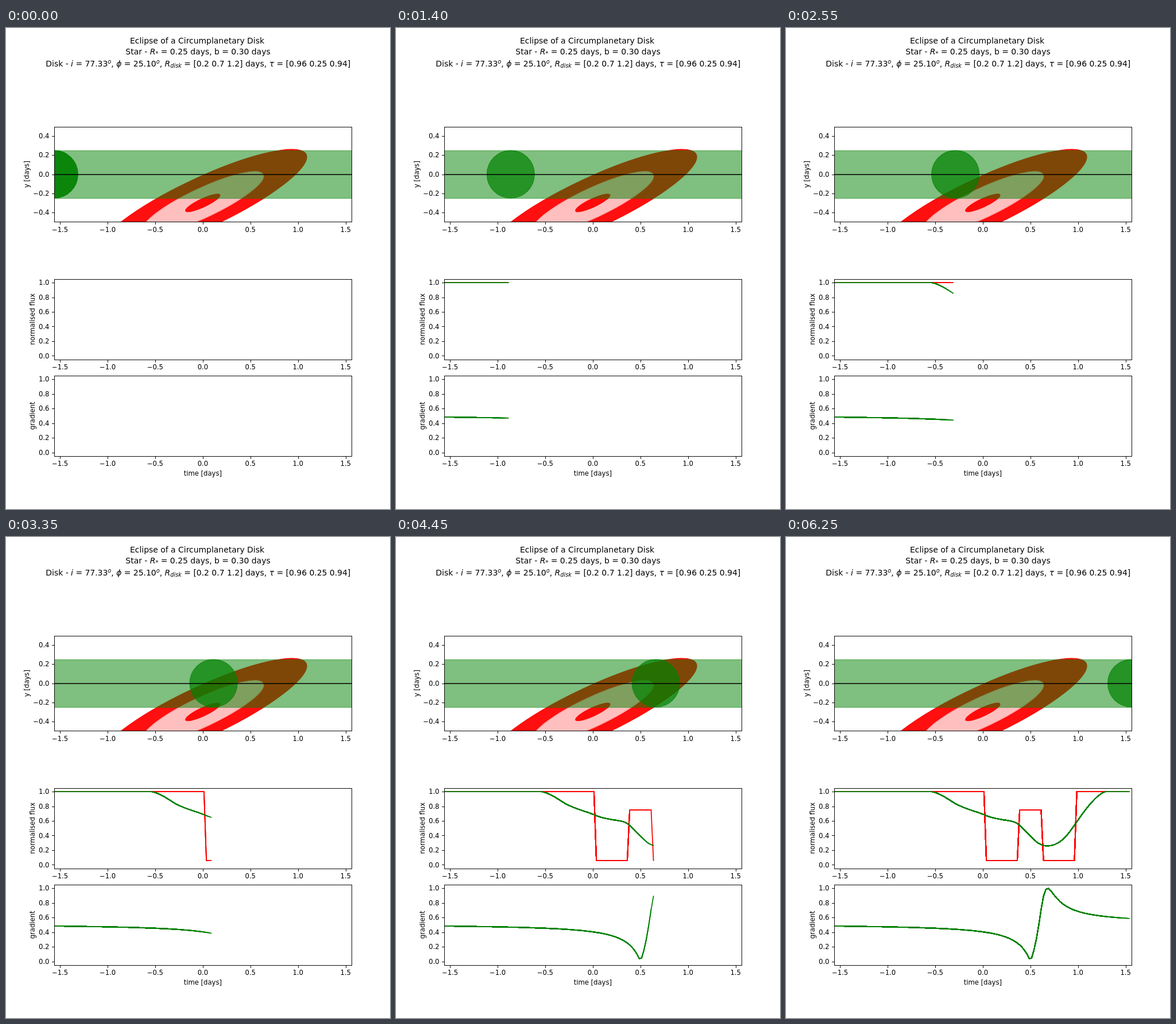
Animation of 669x837 px, one loop 6.3 s. Source, as an HTML page:

```html
<!DOCTYPE html>
<html lang="en">
<head>
<meta charset="utf-8">
<title>Eclipse of a Circumplanetary Disk</title>
<style>
  html, body { margin: 0; width: 100%; height: 100%; overflow: hidden; background: #fff; }
  svg { display: block; font: 11.6px "DejaVu Sans", sans-serif; }
  text { white-space: pre; }
  .title { font-size: 13.93px; text-anchor: middle; }
  .mid { text-anchor: middle; }
  .end { text-anchor: end; }
  .it { font-style: italic; }
  .small { font-style: italic; font-size: 9.75px; }
  .axis { fill: none; stroke: #000; stroke-width: 0.95; }
  .curve { fill: none; stroke-width: 1.74; stroke-linecap: square; stroke-linejoin: round; }
</style>
</head>
<body>
<svg id="stage" width="669" height="837" viewBox="0 0 669 837">
  <text class="title" x="333" y="27">Eclipse of a Circumplanetary Disk</text>
  <text class="title" x="334.5" y="46">Star - <tspan class="it">R</tspan><tspan class="small" dy="2.2">*</tspan><tspan dy="-2.2"> = 0.25 days, b = 0.30 days</tspan></text>
  <text class="title" x="334.8" y="67">Disk - <tspan class="it">i</tspan> = 77.33<tspan class="small" dy="-5">o</tspan><tspan dy="5">, </tspan><tspan class="it">ϕ</tspan> = 25.10<tspan class="small" dy="-5">o</tspan><tspan dy="5">, </tspan><tspan class="it">R</tspan><tspan class="small" dy="2.2">disk</tspan><tspan dy="-2.2"> = [0.2 0.7 1.2] days, </tspan><tspan class="it">τ</tspan> = [0.96 0.25 0.94]</text>
</svg>
<script>
const FRAME_MS = 50, FRAMES = 126;
const STAR_R = 0.25, IMPACT = 0.3;
const INCLINATION = 77.33 * Math.PI / 180, TILT = 25.1 * Math.PI / 180;
const RINGS = [[1.2, 0.94], [0.7, 0.25], [0.2, 0.96]]; // radius, opacity
const SCALE = 165.85, X0 = 342.86, Y0 = 254.56;
const LEFT = 83.625, RIGHT = 602.1;

const px = x => X0 + x * SCALE;
const skyY = y => Y0 - y * SCALE;
const snap = v => Math.floor(v + 0.5) + 0.5;
const unitY = top => v => top + (1.05 - v) * 140.107 / 1.1;
const fluxY = unitY(436.7), gradY = unitY(604.82);
const time = k => -1.5625 + 0.025 * k;

const stage = document.getElementById('stage');
function add(parent, tag, attrs, text) {
  const el = document.createElementNS('http://www.w3.org/2000/svg', tag);
  for (const name in attrs) el.setAttribute(name, attrs[name]);
  if (text !== undefined) el.textContent = text;
  parent.appendChild(el);
  return el;
}

// Shape matrix of a unit-radius ring seen in projection
const cosT = Math.cos(TILT), sinT = Math.sin(TILT), q = Math.cos(INCLINATION) ** 2;
const sxx = cosT ** 2 + q * sinT ** 2;
const syy = sinT ** 2 + q * cosT ** 2;
const sxy = (1 - q) * sinT * cosT;

// Horizontal extent of a ring edge at height y
function chord(radius, y) {
  const h = y + IMPACT, rest = radius ** 2 - h * h / syy;
  if (rest <= 0) return [0, 0];
  const mid = sxy / syy * h, half = Math.sqrt((sxx - sxy * sxy / syy) * rest);
  return [mid - half, mid + half];
}

const overlap = ([a, b], from, to) => Math.max(0, Math.min(b, to) - Math.max(a, from));

// Opacity summed along a horizontal segment
function blocked(y, from, to) {
  const spans = RINGS.map(([r]) => overlap(chord(r, y), from, to));
  return RINGS.reduce((sum, [, tau], i) => sum + tau * (spans[i] - (spans[i + 1] || 0)), 0);
}

function starFlux(x) {
  const n = 240;
  let lost = 0, area = 0;
  for (let i = 0; i < n; i++) {
    const y = STAR_R * ((2 * i + 1) / n - 1), half = Math.sqrt(STAR_R ** 2 - y * y);
    lost += blocked(y, x - half, x + half);
    area += 2 * half;
  }
  return 1 - lost / area;
}

function pointFlux(x) {
  const eps = 1e-6;
  return 1 - blocked(0, x - eps, x + eps) / (2 * eps);
}

function gradient(x) {
  const gx = syy * x - sxy * IMPACT, gy = sxx * IMPACT - sxy * x;
  return Math.abs(gx) / Math.hypot(gx, gy);
}

function panel(id, top, bottom, yOf, ticks, label, labelX) {
  const l = snap(LEFT), r = snap(RIGHT), t = snap(top), b = snap(bottom);
  const clip = add(add(stage, 'defs', {}), 'clipPath', { id });
  add(clip, 'rect', { x: l - 0.5, y: t - 0.5, width: r - l + 0.5, height: b - t + 0.5 });
  const plot = add(stage, 'g', { 'clip-path': `url(#${id})` });
  add(stage, 'rect', { class: 'axis', x: l, y: t, width: r - l, height: b - t });
  const format = v => v.toFixed(1).replace('-', '−');
  for (let v = -1.5; v <= 1.5; v += 0.5) {
    const x = snap(px(v));
    add(stage, 'path', { class: 'axis', d: `M${x} ${b}v4.5` });
    add(stage, 'text', { class: 'mid', x: px(v), y: Math.round(bottom + 17.4) }, format(v));
  }
  for (const v of ticks) {
    const y = snap(yOf(v));
    add(stage, 'path', { class: 'axis', d: `M${l} ${y}h-4.5` });
    add(stage, 'text', { class: 'end', x: 75.5, y: Math.round(yOf(v) + 4.1) }, format(v));
  }
  const mid = (top + bottom) / 2;
  add(stage, 'text', { class: 'mid', transform: `translate(${labelX} ${mid}) rotate(-90)` }, label);
  return plot;
}

const unitTicks = [0, 0.2, 0.4, 0.6, 0.8, 1];
const sky = panel('sky', skyY(0.5), skyY(-0.5), skyY, [-0.4, -0.2, 0, 0.2, 0.4], 'y [days]', 40);
const fluxPlot = panel('flux', 436.7, 576.8, fluxY, unitTicks, 'normalised flux', 50);
const gradPlot = panel('grad', 604.82, 744.93, gradY, unitTicks, 'gradient', 50);
add(stage, 'text', { class: 'mid', x: X0, y: 779 }, 'time [days]');

function paint(color, opacity) {
  return { fill: color, stroke: color, 'stroke-width': 1.16, 'fill-opacity': opacity, 'stroke-opacity': opacity };
}

RINGS.forEach(([radius, tau], i) => {
  const shape = {
    rx: radius * SCALE, ry: radius * Math.cos(INCLINATION) * SCALE,
    transform: `translate(${X0} ${skyY(-IMPACT)}) rotate(-25.1)`
  };
  if (i) add(sky, 'ellipse', { ...shape, ...paint('#fff', 1) });
  add(sky, 'ellipse', { ...shape, ...paint('#f00', tau) });
});
const bandTop = snap(skyY(STAR_R)), bandBottom = snap(skyY(-STAR_R));
add(sky, 'rect', { x: 80, y: bandTop, width: 530, height: bandBottom - bandTop, ...paint('#008000', 0.5) });
const newStar = () => add(sky, 'circle', { cy: Y0, r: STAR_R * SCALE, ...paint('#008000', 0.7) });
const star = newStar(), firstStar = newStar();
firstStar.setAttribute('cx', px(time(0)));
add(sky, 'path', { d: 'M80 255H610', stroke: '#000', 'stroke-width': 1.74 });

// Every step draws all curves anew over the earlier ones, which hardens their edges
function pointsOf(fn, yOf) {
  return Array.from({ length: FRAMES - 1 }, (_, k) =>
    px(time(k)).toFixed(2) + ',' + yOf(fn(time(k))).toFixed(2));
}
const curves = [
  [fluxPlot, '#f00', pointsOf(pointFlux, fluxY)],
  [fluxPlot, '#008000', pointsOf(starFlux, fluxY)],
  [gradPlot, '#008000', pointsOf(gradient, gradY)]
];
const layers = [];
for (let k = 2; k < FRAMES; k++) {
  layers[k] = curves.map(([plot, stroke, points]) =>
    add(plot, 'polyline', { class: 'curve', stroke, points: points.slice(0, k).join(' '), display: 'none' }));
}

function show(frame) {
  star.setAttribute('cx', px(time(frame)));
  firstStar.setAttribute('display', frame === 0 ? 'inline' : 'none');
  layers.forEach((lines, k) => {
    for (const line of lines) line.setAttribute('display', k <= frame ? 'inline' : 'none');
  });
}

const start = performance.now();
let shown = -1;
function tick() {
  const frame = Math.floor((performance.now() - start) / FRAME_MS) % FRAMES;
  if (frame !== shown) show(shown = frame);
  requestAnimationFrame(tick);
}
tick();
</script>
</body>
</html>
```
